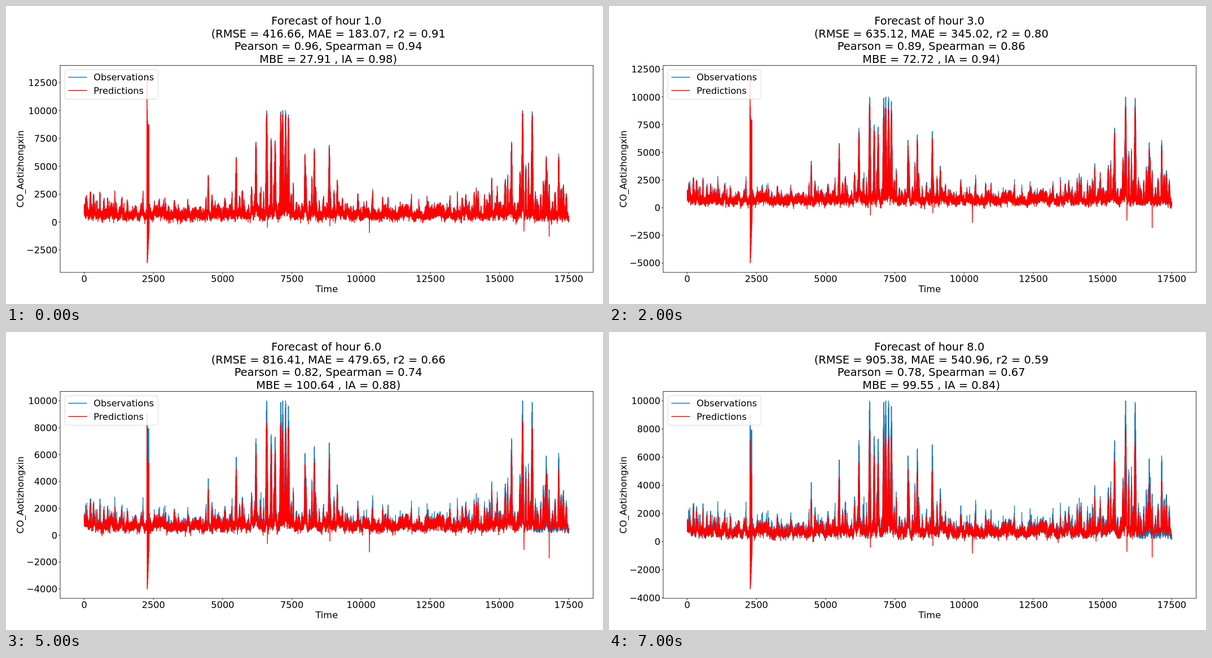
An HTML page that plays this animation: 1058 px wide and 529 px high, repeating every 8 s.

```html
<!DOCTYPE html>
<html lang="en">
<head>
<meta charset="utf-8">
<title>Forecast by hour</title>
<style>
  html, body { margin: 0; width: 100%; height: 100%; overflow: hidden; background: #fff; }
  svg { display: block; width: 100%; height: 100%; }
  text { font-family: "DejaVu Sans", Verdana, sans-serif; font-size: 16.2px; fill: #000; }
  .title text { font-size: 19.44px; text-anchor: middle; }
  .mid { text-anchor: middle; }
  .end { text-anchor: end; }
  .axis { stroke: #000; stroke-width: .8; fill: none; }
  .line { fill: none; stroke-width: 1.4; stroke-linejoin: round; }
  .key { stroke-width: 1.6; }
  .obs { stroke: #1f77b4; }
  .pred { stroke: #f00; }
</style>
</head>
<body>
<svg viewBox="0 0 1058 529">
  <rect width="1058" height="529" fill="#fff"/>
  <path id="obs" class="line obs"/>
  <path id="pred" class="line pred"/>
  <rect class="axis" x="96" y="105.5" width="944.5" height="367.4"/>
  <g id="xTicks"></g>
  <g id="yTicks"></g>
  <text class="mid" x="568.3" y="508.3">Time</text>
  <text class="mid" transform="translate(30.5 289.3) rotate(-90)">CO_Aotizhongxin</text>
  <g id="title" class="title"></g>
  <rect x="104.4" y="113.3" width="165" height="52" rx="3" fill="#fff" fill-opacity=".8" stroke="#ccc" stroke-opacity=".8" stroke-width=".9"/>
  <path class="line key obs" d="M110.5 126.5h33"/>
  <path class="line key pred" d="M110.5 150h33"/>
  <text x="155.2" y="132">Observations</text>
  <text x="155.2" y="155.5">Predictions</text>
</svg>
<script>
const $ = id => document.getElementById(id);
const X0 = 138.6, X1 = 997.3, PER_HOUR = 0.04907;
const TOP = 105.5, BOTTOM = 472.9, PAD = 16.7;
const BURST = [249.4, 253.8];

// Title figures, then the highest and lowest prediction
const HOURS = [
  ["416.66", "183.07", "0.91", "0.96", "0.94", "27.91", "0.98", 13200, -3670],
  ["534.85", "276.08", "0.86", "0.93", "0.90", "51.84", "0.96", 12860, -4810],
  ["635.12", "345.02", "0.80", "0.89", "0.86", "72.72", "0.94", 12000, -4990],
  ["705.37", "397.26", "0.75", "0.87", "0.81", "83.16", "0.92", 10800, -4850],
  ["765.00", "441.72", "0.70", "0.85", "0.77", "91.33", "0.90", 9650, -4600],
  ["816.41", "479.65", "0.66", "0.82", "0.74", "100.64", "0.88", 8150, -4010],
  ["862.58", "512.34", "0.62", "0.80", "0.70", "99.87", "0.86", 7700, -3846],
  ["905.38", "540.96", "0.59", "0.78", "0.67", "99.55", "0.84", 7200, -3370]
];

// Key points as [x, value]
const PEAKS = [[358.5, 4200], [408, 5800], [443, 7200], [462, 10000], [470, 7500], [477, 7300],
  [487, 9900], [490.5, 10000], [495.5, 10000], [500.5, 9600], [530, 6100], [546.5, 6600],
  [573, 6900], [896, 7200], [915.5, 10000], [932.5, 9900], [957.5, 5900], [979.5, 6100]];
const DIPS = [[462.9, -700], [573.5, -500], [643.3, -1400], [917.5, -1200], [962, -1900]];
const SEASON = [[139, 3600], [230, 2000], [340, 2000], [400, 3000], [450, 4200], [525, 4800],
  [590, 3800], [645, 2200], [800, 1900], [860, 4200], [920, 5800], [998, 4200]];

const rand = (i, k) => {
  const v = Math.sin(i * 127.1 + k * 311.7) * 43758.5453;
  return v - Math.floor(v);
};
const mix = (a, b, t) => a + (b - a) * t;

function smooth(x, cell, k) {
  const u = x / cell, i = Math.floor(u);
  return mix(rand(i, k), rand(i + 1, k), (1 - Math.cos(Math.PI * (u - i))) / 2);
}

function along(points, x) {
  let i = 1;
  while (i < points.length - 1 && points[i][0] < x) i++;
  const [a, b] = [points[i - 1], points[i]];
  return mix(a[1], b[1], (x - a[0]) / (b[0] - a[0]));
}

// Polluted spells: the known tops plus seeded smaller ones
const spells = PEAKS.map(([x, h]) => [x, h, 0.5 + h / 9500]);
for (let k = 0, x = 140; x < X1; k++, x += 3 + 4 * rand(k, 1)) {
  spells.push([x, along(SEASON, x) * (0.3 + 0.7 * Math.pow(rand(k, 2), 1.4)), 0.5 + 1.3 * rand(k, 3)]);
}

const spellAt = x => Math.max(...spells.map(([px, h, w]) =>
  h * Math.exp(-Math.pow(Math.max(0, Math.abs(x - px) - 0.3) / w, 2))));

// Half-day samples: low, body and short spike of the observations
const samples = [];
for (let i = 0, x = X0; x <= X1; i++, x += 12 * PER_HOUR) {
  if (x > BURST[0] && x < BURST[1]) continue;
  const late = x > 936;
  const drift = smooth(x, 3.2, 4), spell = spellAt(x);
  const lo = (late ? 100 : 190) + (late ? 120 : 420) * drift * drift + 170 * rand(i, 5) + Math.min(500, spell * 0.08);
  const body = Math.max(lo + 220 + 420 * drift + 260 * rand(i, 6), spell);
  const spike = spell > 2500 ? 0 : 900 * Math.pow(rand(i, 7), 9);
  samples.push({ i, x, lo, body, spike });
}

function forecast({ i, x, lo, body, spike }, hour) {
  const loss = 0.041 * hour * (0.55 + 0.8 * smooth(x, 5, 8));
  const wobble = (rand(i, 10 + hour) - 0.5) * 130 * Math.sqrt(hour);
  const hi = mix(body, lo + 350, loss) + spike * (1 - 0.11 * hour) + wobble;
  const lift = (x > 936 ? 60 : 18) * (hour - 1);
  const dip = 380 * Math.pow(rand(i, 20 + hour), 6);
  return [x, hi, Math.min(hi, lo - 70 + lift - dip)];
}

// The sensor fault: a tall swing that dies down within a few pixels
function burst(max, min, tail) {
  return Array.from({ length: 8 }, (_, j) => [
    250 + 0.45 * j,
    max * mix(tail, 1, Math.exp(-1.2 * j)),
    min * Math.exp(-0.025 * j * j)
  ]);
}

const withBurst = (rows, swing) => rows.concat(swing).sort((a, b) => a[0] - b[0]);

const observed = withBurst(samples.map(s => [s.x, s.body + s.spike, s.lo]), burst(9000, 350, 0.88));

function predicted(hour, max, min) {
  const rows = samples.map(s => forecast(s, hour));
  const depth = 0.5 + 0.5 * Math.sin(Math.PI * hour / 8.5);
  for (const [x, v] of DIPS) rows.find(r => r[0] >= x)[2] = v * depth;
  return withBurst(rows, burst(max, min, 0.66));
}

const trace = (rows, y) => "M" + rows.map(([x, hi, lo]) =>
  `${x.toFixed(2)} ${y(hi).toFixed(2)}L${(x + 0.25).toFixed(2)} ${y(lo).toFixed(2)}`).join("L");

function yTicks(low, high, step, y) {
  let out = "";
  for (let v = Math.ceil(low / step) * step; v <= high; v += step) {
    const py = y(v);
    out += `<path class="axis" d="M96 ${py}h-2.8"/>` +
      `<text class="end" x="91" y="${py + 6}">${String(v).replace("-", "\u2212")}</text>`;
  }
  return out;
}

function scene([rmse, mae, r2, pearson, spearman, mbe, ia, max, min], index) {
  const hour = index + 1;
  const peak = Math.max(10000, max);
  const scale = (BOTTOM - TOP - 2 * PAD) / (peak - min);
  const y = v => TOP + PAD + (peak - v) * scale;
  const margin = PAD / scale;
  const step = (peak - min) * 1.1 / 9 <= 2000 ? 2000 : 2500;
  const lines = [
    `Forecast of hour ${hour}.0`,
    `(RMSE = ${rmse}, MAE = ${mae}, r2 = ${r2}`,
    `Pearson = ${pearson}, Spearman = ${spearman}`,
    `MBE = ${mbe} , IA = ${ia})`
  ];
  return {
    obs: trace(observed, y),
    pred: trace(predicted(hour, max, min), y),
    ticks: yTicks(min - margin, peak + margin, step, y),
    title: lines.map((s, i) => `<text x="${i ? 571.2 : 567.8}" y="${32.8 + i * 22.7}">${s}</text>`).join("")
  };
}

$("xTicks").innerHTML = Array.from({ length: 8 }, (_, i) => {
  const x = X0 + i * 2500 * PER_HOUR;
  return `<path class="axis" d="M${x} 472.9v2.8"/><text class="mid" x="${x}" y="490">${i * 2500}</text>`;
}).join("");

const scenes = HOURS.map(scene);
let shown = -1;

function draw(ms) {
  const k = Math.floor(ms / 1000) % scenes.length;
  if (k === shown) return;
  shown = k;
  const s = scenes[k];
  $("obs").setAttribute("d", s.obs);
  $("pred").setAttribute("d", s.pred);
  $("yTicks").innerHTML = s.ticks;
  $("title").innerHTML = s.title;
}

const start = performance.now();
function tick() {
  draw(performance.now() - start);
  requestAnimationFrame(tick);
}
tick();
</script>
</body>
</html>
```
